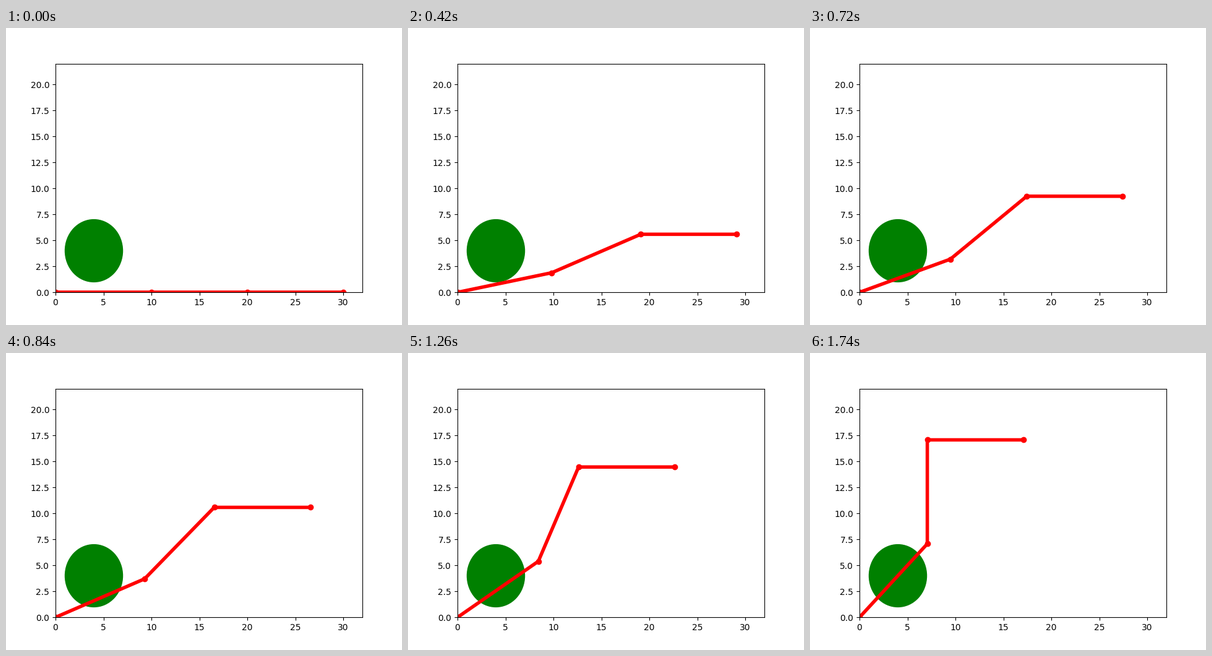
A matplotlib script for the animation above (1800 ms loop, 640 px wide and 480 px high).

```python
import numpy as np
import matplotlib.pyplot as plt
from matplotlib.animation import FuncAnimation

FRAMES = 30
INTERVAL = 60
LINK = 10
END_ANGLE = np.pi / 4

fig, ax = plt.subplots(figsize=(6.4, 4.8), dpi=100)
ax.set_xlim(0, 32)
ax.set_ylim(0, 22)
ax.add_patch(plt.Circle((4, 4), 3, color="green"))
arm, = ax.plot([], [], "o-", color="red", lw=4)


def joints(angle):
    """Base, two elbows and the tip; the last link stays level."""
    headings = np.array([angle, 2 * angle, 0])
    x = np.concatenate(([0], np.cumsum(LINK * np.cos(headings))))
    y = np.concatenate(([0], np.cumsum(LINK * np.sin(headings))))
    return x, y


def update(i):
    arm.set_data(*joints(END_ANGLE * i / (FRAMES - 1)))
    return arm,


anim = FuncAnimation(fig, update, frames=FRAMES, interval=INTERVAL,
                     repeat=True, repeat_delay=0)
plt.show()
```
